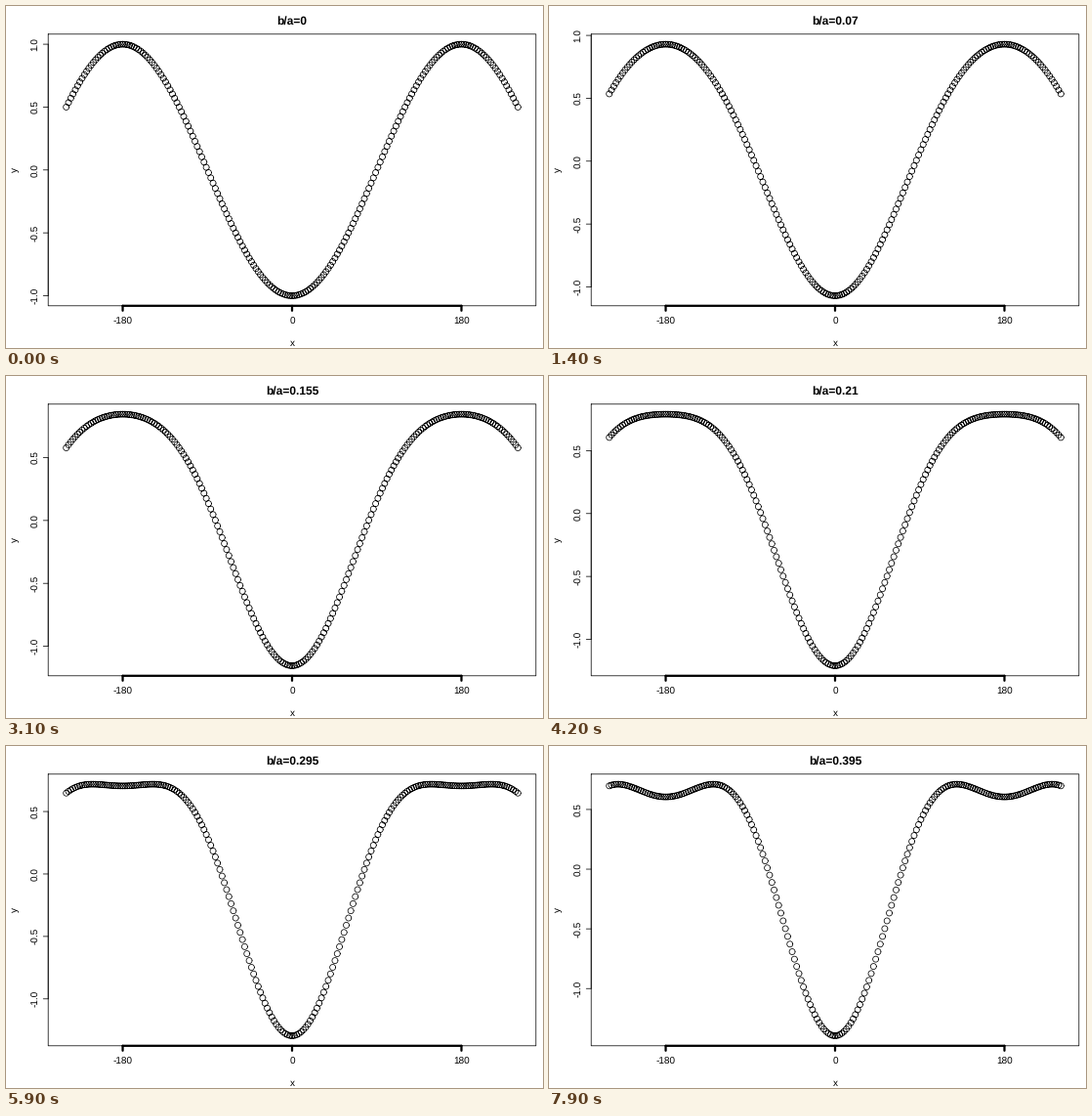
Recreate the animation shown at these times as a matplotlib script. Size 550 px wide and 350 px high, loop 8000 ms.

```python
import matplotlib.pyplot as plt
import numpy as np
from matplotlib.animation import FuncAnimation

W, H = 550, 350
DPI = 100
PX = 72 / DPI
FRAMES, INTERVAL = 80, 100
STEP = 0.005
LEFT, RIGHT, TOP, BOTTOM = 43.2, 542.8, 28.8, 306.8
PAD = 0.04
TICK = 5
THIN, BOLD = 0.75, 2.25
RADIUS = 3

plt.rcParams.update({
    "font.family": "Liberation Sans",
    "text.hinting": "no_hinting",
    "path.simplify": False,
    "path.snap": False,
})

fig = plt.figure(figsize=(W / DPI, H / DPI), dpi=DPI, facecolor="white")
ax = fig.add_axes([0, 0, 1, 1])
ax.set(xlim=(0, W), ylim=(H, 0))
ax.axis("off")

deg = np.linspace(-240, 240, 201)


def scale(v, lo, hi, start, end):
    """Map lo..hi onto start..end, leaving a margin at both ends."""
    pad = PAD * (hi - lo)
    return start + (v - lo + pad) / (hi - lo + 2 * pad) * (end - start)


def line(xs, ys, width=THIN):
    return ax.plot(xs, ys, color="black", lw=width * PX,
                   solid_capstyle="round", solid_joinstyle="round")[0]


def label(x, y, text, size=10, va="baseline", **kw):
    return ax.text(x, y, text, fontsize=size * PX, ha="center", va=va, **kw)


def wave(ratio):
    t = np.radians(deg)
    return -np.cos(t) - ratio * np.cos(2 * t)


# Unit circle closed by a gap, so one line can hold many rings
angle = np.linspace(0, 2 * np.pi, 33)
ring_x = RADIUS * np.append(np.cos(angle), np.nan)
ring_y = RADIUS * np.append(np.sin(angle), np.nan)


def rings(xs, ys):
    return np.add.outer(xs, ring_x).ravel(), np.add.outer(ys, ring_y).ravel()


# Frame and horizontal axis
line([LEFT, RIGHT, RIGHT, LEFT, LEFT], [TOP, TOP, BOTTOM, BOTTOM, TOP])
x_ticks = [scale(v, -240, 240, LEFT, RIGHT) for v in (-180, 0, 180)]
line([x_ticks[0], x_ticks[-1]], [BOTTOM, BOTTOM], BOLD)
for x, text in zip(x_ticks, ("-180", "0", "180")):
    line([x, x], [BOTTOM, BOTTOM + TICK], BOLD)
    label(x, 326, text)
label(293, 348, "x")
label(9.5, 168, "y", va="center", rotation=90)

# Moving parts
title = label(293, 19, "", 12, weight="bold")
dots = line([], [])
dot_x = scale(deg, -240, 240, LEFT, RIGHT)
y_ticks = []
for value in (-1.0, -0.5, 0.0, 0.5, 1.0):
    mark = line([LEFT - TICK, LEFT], [0, 0])
    text = label(30.5, 0, f"{value:.1f}", va="center", rotation=90)
    y_ticks.append((value, mark, text))
y_axis = line([LEFT, LEFT], [0, 0])


def update(i):
    ratio = i * STEP
    y = wave(ratio)
    lo, hi = y.min(), y.max()
    dots.set_data(*rings(dot_x, scale(y, lo, hi, BOTTOM, TOP)))
    title.set_text(f"b/a={ratio:.3g}")
    visible = []
    for value, mark, text in y_ticks:
        pos = scale(value, lo, hi, BOTTOM, TOP)
        shown = TOP - 1e-6 <= pos <= BOTTOM + 1e-6
        mark.set_ydata([pos, pos])
        text.set_y(pos)
        mark.set_visible(shown)
        text.set_visible(shown)
        if shown:
            visible.append(pos)
    y_axis.set_ydata([visible[0], visible[-1]])
    return dots, title


anim = FuncAnimation(fig, update, frames=FRAMES, interval=INTERVAL,
                     init_func=lambda: update(0), repeat=True,
                     repeat_delay=0, blit=False)
plt.show()
```
